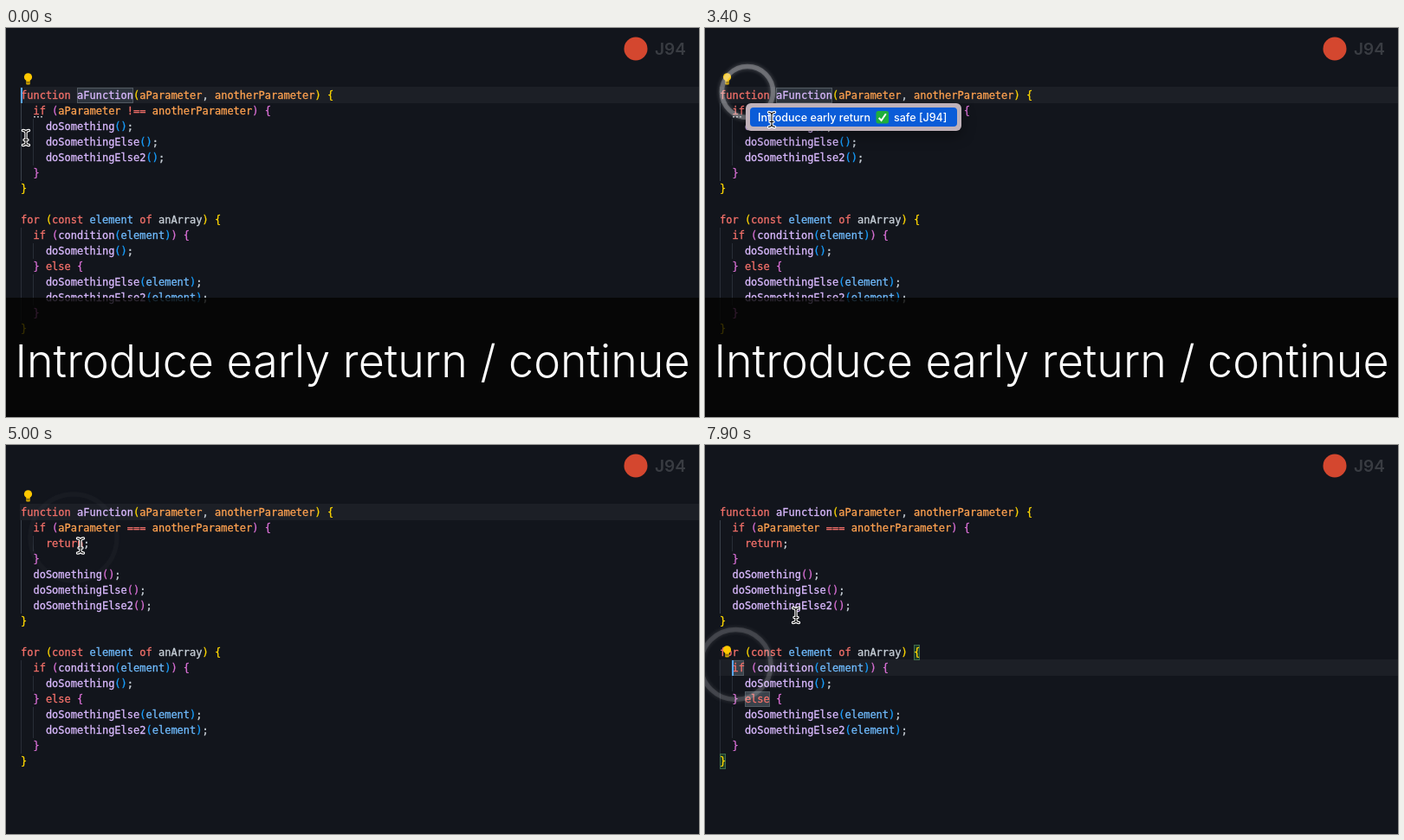
Write an HTML page with a canvas that moves like this. It is 800 by 450 pixels and loops after 8 s.

```html
<!DOCTYPE html>
<html lang="en">
<head>
<meta charset="utf-8">
<title>Introduce early return / continue</title>
<style>
html, body { margin: 0; width: 100%; height: 100%; overflow: hidden; background: #12151c; }
canvas { display: block; width: 800px; height: 450px; }
</style>
</head>
<body>
<canvas id="stage" width="800" height="450"></canvas>
<script>
const ctx = document.getElementById('stage').getContext('2d');
const LOOP = 8000, STEP = 100;
const LEFT = 17, TOP = 68, LINE = 18, CHAR = 7.224;
const MONO = '12px "DejaVu Sans Mono", monospace';
const BRACKETS = ['#ffd700', '#da70d6', '#179fff'];
const COLORS = {
  keyword: '#f4716a', name: '#dabaff', param: '#ffa250',
  variable: '#70bcff', plain: '#c9d1d9'
};

const LOOP_CODE = `
for (const element of anArray) {
  if (condition(element)) {
    doSomething();
  } else {
    doSomethingElse(element);
    doSomethingElse2(element);
  }
}`;
const BEFORE = `function aFunction(aParameter, anotherParameter) {
  if (aParameter !== anotherParameter) {
    doSomething();
    doSomethingElse();
    doSomethingElse2();
  }
}
${LOOP_CODE}`;
const AFTER = `function aFunction(aParameter, anotherParameter) {
  if (aParameter === anotherParameter) {
    return;
  }
  doSomething();
  doSomethingElse();
  doSomethingElse2();
}
${LOOP_CODE}`;

// Pointer stops: time, x, y
const PATH = [
  [100, 23, 127], [1000, 37, 97.5], [1700, 37, 97.5], [2300, 49, 74],
  [2700, 49, 74], [3400, 77, 106], [3750, 78, 107], [4500, 85, 115.5],
  [4600, 86, 116.5], [5400, 86, 116.5], [6700, 35, 254], [6850, 35, 254],
  [7300, 105, 197]
];
const CLICKS = [[2600, 49, 74], [3715, 78, 107], [6840, 35.5, 254]];

const clamp = v => Math.max(0, Math.min(1, v));
const ease = p => p * p * (3 - 2 * p);
const within = (t, a, b) => t >= a && t < b;
const columnX = col => LEFT + col * CHAR;
const lineY = row => TOP + row * LINE;

function rect(x, y, w, h, color) {
  ctx.fillStyle = color;
  ctx.fillRect(x, y, w, h);
}

function rounded(x, y, w, h, r, color) {
  ctx.fillStyle = color;
  ctx.beginPath();
  ctx.roundRect(x, y, w, h, r);
  ctx.fill();
}

function disc(x, y, r, color) {
  ctx.fillStyle = color;
  ctx.beginPath();
  ctx.arc(x, y, r, 0, Math.PI * 2);
  ctx.fill();
}

function text(str, x, y, font, color) {
  ctx.font = font;
  ctx.fillStyle = color;
  ctx.fillText(str, x, y);
}

// Code glyphs are slightly heavier than the regular weight
function codeText(str, x, y, color) {
  text(str, x, y, MONO, color);
  ctx.strokeStyle = color;
  ctx.lineWidth = .3;
  ctx.strokeText(str, x, y);
}

function faded(alpha, draw) {
  if (alpha <= 0) return;
  ctx.save();
  ctx.globalAlpha = alpha;
  draw();
  ctx.restore();
}

function tokenColor(token) {
  if (/^(function|if|for|const|of|else|return|[!=]==)$/.test(token)) return COLORS.keyword;
  if (/Parameter$/.test(token)) return COLORS.param;
  if (token === 'element') return COLORS.variable;
  if (token === 'anArray' || !/\w/.test(token)) return COLORS.plain;
  return COLORS.name;
}

function drawCode(code) {
  let depth = 0;
  code.split('\n').forEach((line, row) => {
    for (const { 0: token, index } of line.matchAll(/\w+|[!=]==|[^\s\w]/g)) {
      let color = tokenColor(token);
      if (/[)}]/.test(token)) color = BRACKETS[--depth % 3];
      if (/[({]/.test(token)) color = BRACKETS[depth++ % 3];
      codeText(token, columnX(index), lineY(row) + 13.5, color);
    }
  });
}

function guide(col, from, to, color = '#292e37') {
  rect(Math.round(columnX(col)), lineY(from) + 1, 1, (to - from) * LINE, color);
}

function drawGuides(edited) {
  const shift = edited ? 1 : 0;
  guide(0, 1, 6 + shift, '#3a414b');
  guide(2, 2, edited ? 3 : 5);
  guide(0, 9 + shift, 15 + shift);
  guide(2, 10 + shift, 11 + shift);
  guide(2, 12 + shift, 14 + shift);
}

function box(col, row, chars, fill, border) {
  const x = Math.round(columnX(col)), y = lineY(row) + 1, w = Math.round(chars * CHAR);
  rect(x, y, w, LINE, fill);
  ctx.strokeStyle = border;
  ctx.lineWidth = 1;
  ctx.strokeRect(x + .5, y + .5, w - 1, LINE - 1);
}

function drawBulb(row) {
  const y = lineY(row) - 10;
  rounded(23.2, y + 2, 4.6, 5.5, 1, '#d6a800');
  disc(25.5, y - 1.2, 4.6, '#ffc800');
  rect(23.5, y + 4.5, 4, 1, '#5c4a10');
}

function drawCheck(x, y, size) {
  rounded(x, y, size, size, 2.5, '#1fae3c');
  ctx.strokeStyle = '#fff';
  ctx.lineWidth = 2;
  ctx.beginPath();
  ctx.moveTo(x + size * .22, y + size * .55);
  ctx.lineTo(x + size * .42, y + size * .76);
  ctx.lineTo(x + size * .78, y + size * .22);
  ctx.stroke();
}

function drawTooltip() {
  const link = '#388bfd', ink = '#c9d1d9', dim = '#8b949e';
  rect(31, 18, 336, 69, '#30363d');
  rect(32, 19, 334, 67, '#161b22');
  rect(32, 65, 334, 1, '#30363d');
  codeText('You can introduce an early return statement.', 40, 36, ink);
  drawCheck(40, 42.5, 14.5);
  codeText('safe', 67, 54, ink);
  codeText('j94(', 101, 54, dim);
  codeText('introduce-early-return', 130.5, 54, link);
  rect(131, 57, 159, 1, link);
  codeText(')', 289.4, 54, dim);
  text('Quick Fix... (⌥Enter)', 40, 79, '12px Inter, "DejaVu Sans", sans-serif', link);
}

function drawMenu() {
  const font = '500 12.5px Inter, sans-serif';
  ctx.save();
  ctx.shadowColor = 'rgba(0,0,0,.4)';
  ctx.shadowBlur = 16;
  ctx.shadowOffsetY = 5;
  rounded(47, 87, 249, 32, 6, '#bfb1b9');
  ctx.restore();
  rounded(52, 92, 239, 22, 4, '#0a5cd8');
  text('Introduce early return', 61, 108, font, '#fff');
  drawCheck(197.5, 96, 14.5);
  text('safe [J94]', 218, 108, font, '#fff');
}

function drawRing(t, [start, x, y]) {
  const age = t - start;
  const radius = age * .042 - 4;
  if (radius <= 0) return;
  faded(.6 * Math.min(1, 1.25 * (1 - age / 1320)), () => {
    ctx.strokeStyle = '#e4e4e6';
    ctx.shadowColor = '#e4e4e6';
    ctx.shadowBlur = 5;
    ctx.lineWidth = 5.5;
    ctx.beginPath();
    ctx.arc(x, y, radius, 0, Math.PI * 2);
    ctx.stroke();
  });
}

function pointerAt(t) {
  const next = PATH.findIndex(stop => stop[0] > t);
  if (next === 0) return PATH[0].slice(1);
  if (next < 0) return PATH[PATH.length - 1].slice(1);
  const [t0, x0, y0] = PATH[next - 1], [t1, x1, y1] = PATH[next];
  const p = ease((t - t0) / (t1 - t0));
  return [x0 + (x1 - x0) * p, y0 + (y1 - y0) * p];
}

function outline(path, outer, inner) {
  ctx.lineCap = ctx.lineJoin = 'round';
  ctx.strokeStyle = '#fff';
  ctx.lineWidth = outer;
  ctx.stroke(path);
  ctx.strokeStyle = '#000';
  ctx.lineWidth = inner;
  ctx.stroke(path);
}

const IBEAM = new Path2D('M-3.5-8.5Q-.5-8.5 0-6Q.5-8.5 3.5-8.5M0-6V6M-3.5 8.5Q-.5 8.5 0 6Q.5 8.5 3.5 8.5M-2 2.5H2');
const HAND = new Path2D('M-2 5V-2Q0-5 2-2V4Q4 2 6 4Q8 3 10 5Q13 4 13 7V10Q12 13 10 16H1L-5 8Q-5 5-2 7Z');

function drawPointer(t) {
  const [x, y] = pointerAt(t);
  ctx.save();
  ctx.translate(x, y);
  if (within(t, 2100, 2900)) {
    outline(HAND, 3, 1.4);
    ctx.fillStyle = '#fff';
    ctx.fill(HAND);
  } else {
    outline(IBEAM, 3.4, 1.1);
  }
  ctx.restore();
}

function caretVisible(t) {
  if (t < 200) return true;
  if (t < 2900) return Math.floor((t - 100) / 500) % 2 === 1;
  if (t < 4200) return false;
  const reset = t < 6900 ? 4200 : 6900;
  return Math.floor((t - reset) / 500) % 2 === 0;
}

function drawLogo() {
  disc(727, 24, 13.5, '#d4472f');
  text('J94', 749, 31, '600 19px Inter, sans-serif', '#393c42');
}

function drawCaption() {
  rect(0, 312, 800, 138, 'rgba(3,3,0,.8)');
  ctx.textAlign = 'center';
  text('Introduce early return / continue', 400, 404, '300 52px Inter, sans-serif', '#fff');
}

function drawEditor(t) {
  const edited = t >= 4200, moved = t >= 6900;
  const caretRow = moved ? 10 : 0, caretCol = moved ? 2 : 0;
  rect(16, lineY(caretRow), 784, 19, '#1c1f26');
  drawGuides(edited);
  if (!edited) box(9, 0, 9, '#2d343d', '#515961');
  if (moved) {
    box(31, 9, 1, '#1b3a29', '#3f6b4b');
    box(0, 16, 1, '#1b3a29', '#3f6b4b');
  }
  if (t >= 7100) {
    box(2, 10, 2, '#3a424b', '#515961');
    box(4, 12, 4, '#3a424b', '#515961');
  }
  drawCode(edited ? AFTER : BEFORE);
  if (!edited) for (let i = 0; i < 3; i++) rect(32 + i * 4, 102, 2, 1.5, '#b4b9bf');
  if (caretVisible(t)) rect(Math.floor(columnX(caretCol)), lineY(caretRow) + 1, 2, LINE, '#58a6ff');
  if (!edited || within(t, 4800, 6900) || t >= 7200) drawBulb(caretRow);
}

function render(t) {
  ctx.textAlign = 'left';
  rect(0, 0, 800, 450, '#12151c');
  drawEditor(t);
  if (t < 2800) faded(clamp((t - 1080) / 220), drawTooltip);
  faded(1 - clamp((t - 4600) / 300), drawCaption);
  CLICKS.forEach(click => drawRing(t, click));
  if (t >= 2900) faded(1 - clamp((t - 3900) / 250), drawMenu);
  drawLogo();
  drawPointer(t);
}

function frame(now) {
  render(Math.floor(now % LOOP / STEP) * STEP);
  requestAnimationFrame(frame);
}
requestAnimationFrame(frame);
</script>
</body>
</html>
```
